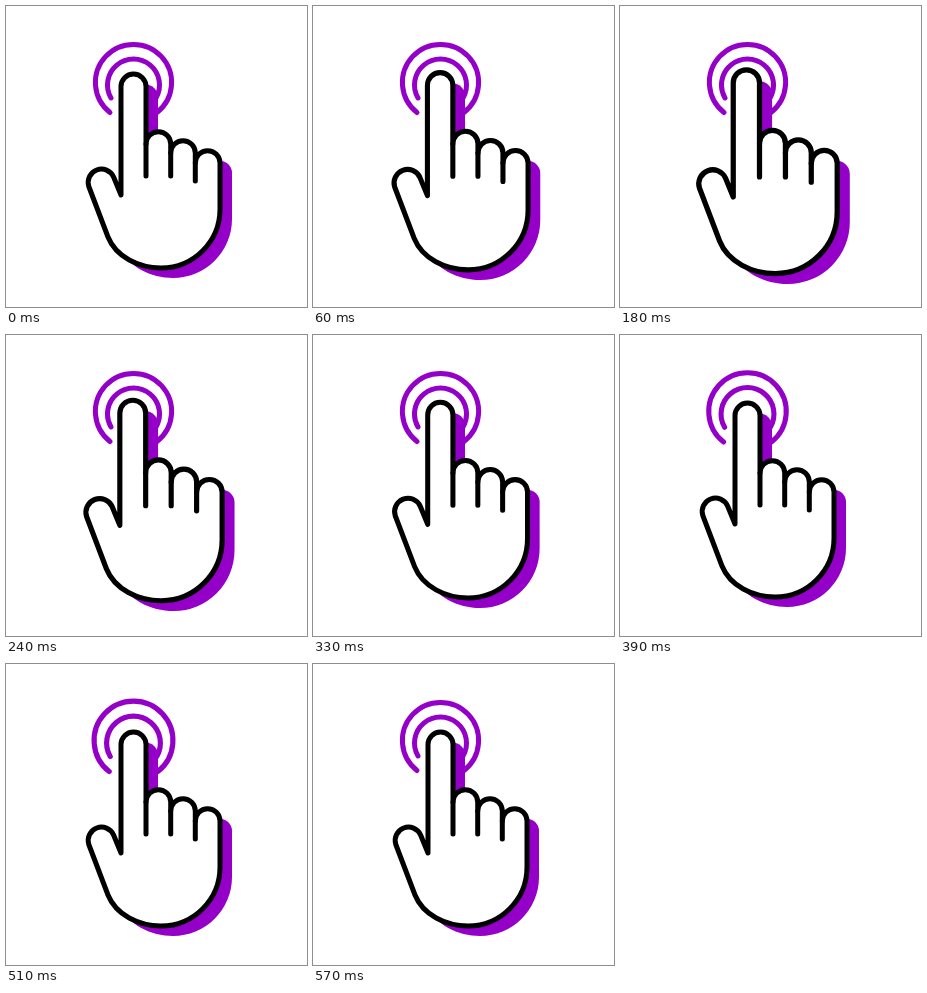
An HTML page for the animation above (1.8 s loop, 301x301 px).

```html
<!DOCTYPE html>
<html lang="en">
<head>
<meta charset="utf-8">
<title>Tap</title>
<style>
html, body { margin: 0; width: 100%; height: 100%; overflow: hidden; background: #fff; }
svg { display: block; width: 100vw; height: 100vh; }
.line { fill: none; stroke-width: 5; stroke-linecap: round; stroke-linejoin: round; }
</style>
</head>
<body>
<svg viewBox="0 0 301 301">
  <g id="rings" class="line" stroke="#9400c8">
    <path d="M104 106.5A38.1 38.1 0 1 1 151 106.5"/>
    <path d="M105 92A26 26 0 1 1 150 92"/>
  </g>
  <g id="hand">
    <g fill="#9400c8">
      <path d="M127 91A12.5 12.5 0 0 1 152 91V180H127Z"/>
      <path d="M201.3 167A12.35 12.35 0 0 1 226 167V213A59 59 0 0 1 167 272C145 272 122 261 114 241Z"/>
    </g>
    <g class="line" stroke="#000">
      <path fill="#fff" d="M115 189V80.5A12.5 12.5 0 0 1 140 80.5V138A12.35 12.35 0 0 1 164.7 138V147A12.3 12.3 0 0 1 189.3 147V157A12.35 12.35 0 0 1 214 157V203A59 59 0 0 1 155 262C133 262 110 251 102 231L82.8 180.5A13.3 13.3 0 0 1 107.6 171Z"/>
      <path d="M140 138V170M164.7 147V170M189.3 157V175"/>
    </g>
  </g>
</svg>
<script>
const LOOP = 1800, STEP = 30;
const hand = document.getElementById('hand');
const rings = document.getElementById('rings');

// Linear rise and fall between two times, 0 outside them.
const pulse = (t, from, to) =>
  Math.max(0, 1 - Math.abs((2 * t - from - to) / (to - from)));

function scaleAbout(el, x, y, s) {
  el.setAttribute('transform', `translate(${x} ${y}) scale(${s}) translate(${-x} ${-y})`);
}

function draw() {
  const t = Math.floor((performance.now() % LOOP) / STEP) * STEP;
  scaleAbout(hand, 150, 150.5, 1 + 0.05 * pulse(t, 0, 360));
  scaleAbout(rings, 127.5, 76.5, 1 + 0.06 * pulse(t, 360, 570));
  requestAnimationFrame(draw);
}
draw();
</script>
</body>
</html>
```
